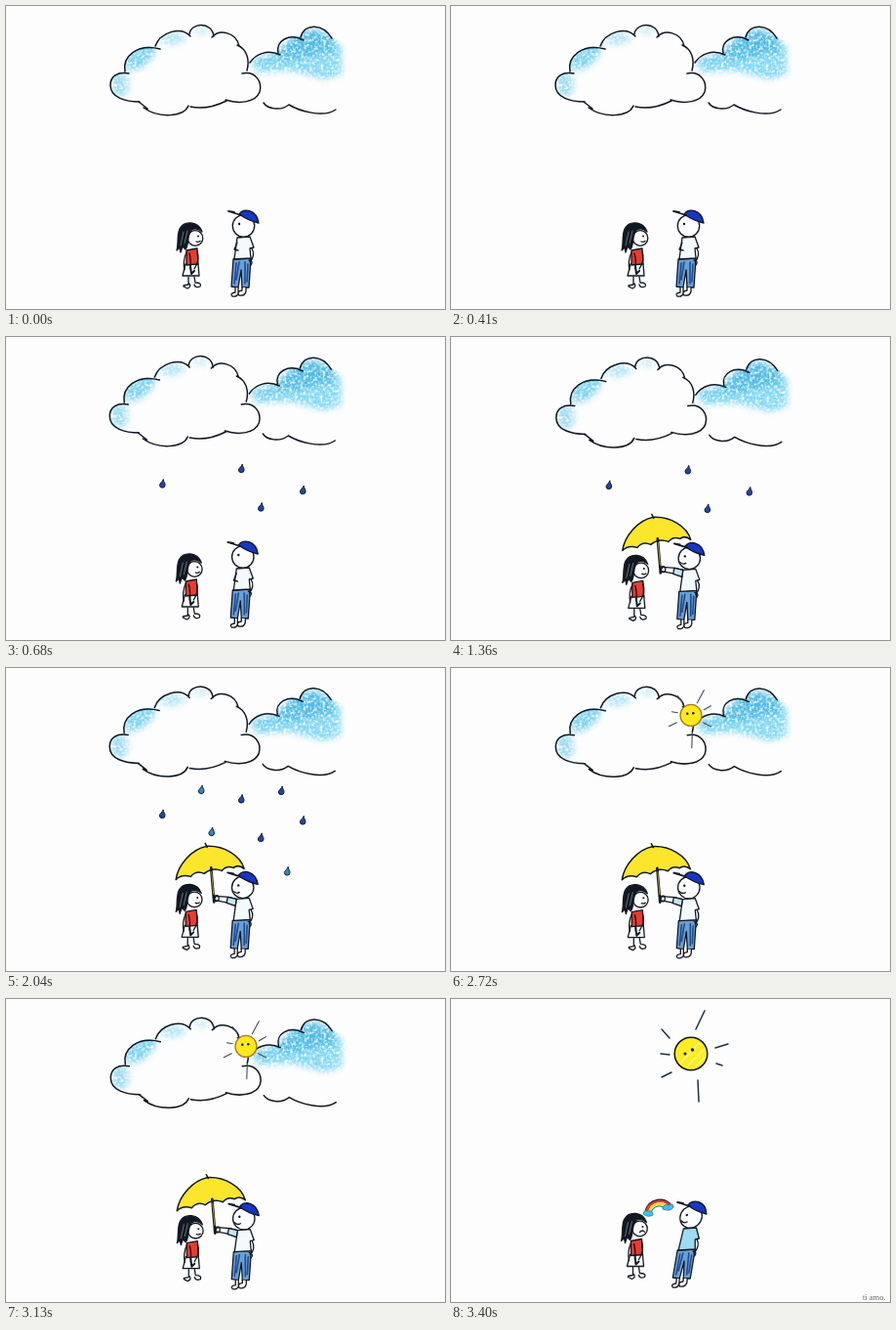
An HTML page for the animation above (4.08 s loop, 450x310 px).

```html
<!DOCTYPE html>
<html lang="it">
<head>
<meta charset="utf-8">
<title>Under the umbrella</title>
<style>
html, body { margin: 0; height: 100%; overflow: hidden; background: #fdfdfd; }
svg { display: block; width: 100vw; height: 100vh; }
.ink { fill: none; stroke: #111821; stroke-width: 1.5; stroke-linecap: round; stroke-linejoin: round; }
.thin { stroke-width: 1.3; }
.dot { fill: #111821; stroke: none; }
.paper { fill: #fdfdfd; }
.wash { filter: url(#crayon); }
text { font: 8.5px "Liberation Serif", "Noto Serif", serif; fill: #666; }
</style>
</head>
<body>
<svg viewBox="0 0 450 310">
  <defs>
    <filter id="crayon" x="-20%" y="-30%" width="140%" height="160%">
      <feGaussianBlur stdDeviation="3" result="soft"/>
      <feTurbulence type="fractalNoise" baseFrequency=".35" numOctaves="2" seed="4"/>
      <feColorMatrix values="0 0 0 0 0  0 0 0 0 0  0 0 0 0 0  2.5 0 0 0 -.45" result="grain"/>
      <feComposite in="soft" in2="grain" operator="in"/>
    </filter>
    <clipPath id="leftCloud"><path d="M137 98C123 98 107 94 107 81C107 72 114 67 122 68C120 52 134 38 153 42C158 27 179 20 188 30C189 17 211 15 213 30C222 22 236 29 239 41C247 45 250 55 247 66V98Z"/></clipPath>
    <clipPath id="rightCloud"><path d="M250 58C256 49 268 44 279 49C276 36 290 27 302 32C306 17 325 18 334 32L350 39V85H250Z"/></clipPath>
    <path id="drop" d="M1-4.500C1-2 3-.5 2.800 1.600A2.800 2.600 0 0 1-2.800 1.600C-2.800-.6 0-1.500 1-4.500Z" stroke="#141e3c"/>
  </defs>

  <g id="scene">
    <g data-show="01234">
      <g clip-path="url(#leftCloud)">
        <g class="wash" fill="#7ad3ef">
          <ellipse cx="138" cy="51" rx="19" ry="10" transform="rotate(-42 138 51)"/>
          <ellipse cx="117" cy="80" rx="9" ry="13" opacity=".75"/>
          <ellipse cx="170" cy="33" rx="14" ry="7" opacity=".55"/>
          <ellipse cx="201" cy="25" rx="9" ry="5" opacity=".35"/>
        </g>
      </g>
      <g clip-path="url(#rightCloud)">
        <g class="wash">
          <path d="M250 57L280 45L300 24L334 29L344 42V70L326 75L292 66L258 68Z" fill="#82d8f4"/>
          <path d="M280 44L298 30L316 22L334 32L338 46L300 54L276 56Z" fill="#3fb2e0" opacity=".75"/>
          <ellipse cx="264" cy="55" rx="9" ry="4" fill="#4db9e2" opacity=".5"/>
        </g>
      </g>
      <g class="ink">
        <path d="M137 98C123 98 107 94 107 81C107 72 114 67 126 69M122 67C119 52 134 38 158 44M153 41C158 27 179 20 189 31M188 29C189 17 211 15 213 31M211 32C219 23 236 27 239 41M237 40C247 44 250 55 247 66"/>
        <path d="M242 69C256 66 263 78 260 88C256 98 240 101 225 96M226 97C216 102 202 106 189 103M187 102C182 114 156 115 141 104M136 98L145 105"/>
        <path d="M250 58C256 49 268 44 281 50M279 48C276 36 290 27 305 35M302 32C306 17 325 18 334 33M264 99C268 105 281 108 290 101C300 107 325 115 338 106"/>
      </g>
    </g>

    <g data-show="123" fill="#2545a0">
      <use href="#drop" x="161" y="150"/>
      <use href="#drop" x="242" y="134.500"/>
      <use href="#drop" x="262" y="174"/>
      <use href="#drop" x="305" y="156.500"/>
    </g>
    <g data-show="3" fill="#3489b8">
      <use href="#drop" x="201" y="125"/>
      <use href="#drop" x="283" y="126" fill="#2545a0"/>
      <use href="#drop" x="211.500" y="168"/>
      <use href="#drop" x="289" y="208.500"/>
    </g>

    <g id="girl" class="ink thin">
      <path class="paper" d="M184 264L181 276L198 276L197 264Z"/>
      <path d="M185 250L196 248L197 264L185 265Z" fill="#ee3a2e"/>
      <path d="M185 252Q181 261 183 270M188 253Q190 260 189 269M196 251Q199 260 193 269"/>
      <path d="M189 266L190 274L193 271" stroke-width="2"/>
      <path d="M187 277L187 285L182 286M193 277L194 283Q201 283 199 287Q194 289 193 285M187 283Q191 287 186 289L182 287"/>
      <circle class="paper" cx="194" cy="237.500" r="7.800"/>
      <path d="M201 231C197 220 183 219 178 228C175 235 177 243 175 250L178 247L179 252L181 246L184 249C188 244 185 236 190 229Q196 226 201 231Z" fill="#111821"/>
      <path d="M182 231L179 245M186 230L183 243" stroke="#8b959e" stroke-width=".7"/>
      <circle class="dot" cx="197" cy="235.500" r="1"/>
      <path d="M195 241q2 1 4-.5" data-show="01234"/>
      <path d="M194 241q3-3 5 0" data-show="5"/>
    </g>

    <g id="boy" class="ink thin">
      <path d="M233 259L251 258L249 288L242 288L241 270L238 288L231 287Z" fill="#6c9fd2"/>
      <path d="M236 263L234 284M239 262L236 280M245 262L245 284M248 264L247 282" stroke="#1c4c94" stroke-width="1.600"/>
      <path d="M235 288L235 293Q229 294 232 297Q237 298 238 294V288M242 288L242 291Q236 292 239 296Q245 297 246 292V288" class="paper"/>
      <path id="shirt" d="M237 237L234 259L251 258L250 248L254 247L250 236Z"/>
      <path d="M252 248Q256 255 250 262M249 260Q254 261 251 265"/>
      <path data-show="01" d="M237 242L234 249L238 250"/>
      <g data-show="234">
        <path class="paper" d="M237 237L229 235L216 234L214 238L229 241L236 244"/>
        <path d="M228 235L237 237L236 244L227 241Z" fill="#c4e5ef"/>
      </g>
      <circle class="paper" cx="243.500" cy="225" r="11.200"/>
      <path d="M239 213C243 206 257 208 259 222Q249 220 239 213Z" fill="#1636c4"/>
      <path d="M241 214L228 210L234 211" stroke-width="1.800"/>
      <circle class="dot" cx="239" cy="223" r="1.200"/>
      <path d="M234 229q3 3 6 1" data-show="2345"/>
    </g>

    <g data-show="234" class="ink">
      <path d="M175 217C177 202 191 186 206 183C224 182 241 192 245 206Q239 201 234 205Q227 202 222 208Q212 204 204 211Q196 207 190 214Q181 211 175 217Z" fill="#fbe62c"/>
      <path d="M205 180L207 184"/>
      <path d="M211 205L214 240" stroke-width="2.600"/>
      <path d="M211.500 209L213.500 232" stroke="#c9a72b" stroke-width=".8"/>
      <path d="M214 234q5-2 5 2t-4 3" class="thin"/>
    </g>

    <g data-show="4" class="ink thin">
      <circle cx="245.700" cy="48.700" r="11" fill="#ffe91d" stroke="#a77b23"/>
      <circle class="dot" cx="242" cy="47" r="1.200"/>
      <circle class="dot" cx="248" cy="46.500" r="1.200"/>
      <path d="M252 36L259 23M259 43L266 39M237 35L232 29M232 46L226 45M231 56L223 60M258 56L266 60M247 66L246.500 82" stroke="#3f4c5a" stroke-width="1.100"/>
    </g>

    <g data-show="5">
      <g class="ink">
        <circle cx="246" cy="56" r="16.800" fill="#ffed1e"/>
        <path d="M236 65L254 45M242 69L260 51M251 69L260 60" stroke="#fff799" stroke-width="1.400"/>
        <circle class="dot" cx="240" cy="56" r="1.500"/>
        <circle class="dot" cx="247.500" cy="52" r="1.700"/>
        <path d="M251 31L260 12M271 50L284 46M272 66L278 68M253 83L254 105M216 80L226 75M215 56L224 57M216 31L224 40" stroke="#19314a"/>
      </g>
      <g fill="none" stroke-width="2.500">
        <path d="M200 218C203 204 220 203 225 212" stroke="#17202b" stroke-width="3.500"/>
        <path d="M200 218C203 205 220 204 225 212" stroke="#e83b28"/>
        <path d="M203 219C205 208 217 207 222 214" stroke="#ffd33a"/>
        <path d="M205 219C207 211 216 210 220 215" stroke="#2f9a61" stroke-width="1.200"/>
      </g>
      <path d="M197 220Q198 215 202 217Q207 216 207 221Q202 224 197 220ZM217 213Q219 209 223 211Q228 208 228 213Q225 218 217 215Z" fill="#42bee8" stroke="#237ca4" stroke-width=".8"/>
      <text x="422" y="308">ti amo.</text>
    </g>
  </g>
</svg>
<script>
const STEP = 680, COUNT = 6;
const jitter = [[0, 0], [-.7, 0], [.8, 1.4], [-.8, -.6], [.3, -.3], [0, 0]];
const $ = id => document.getElementById(id);
const parts = document.querySelectorAll('[data-show]');
let shown = -1;

function draw(pose) {
  const last = pose === COUNT - 1;
  for (const part of parts)
    part.style.display = part.dataset.show.includes(pose) ? '' : 'none';
  $('scene').setAttribute('transform', `translate(${jitter[pose]})`);
  $('girl').setAttribute('transform', last ? 'translate(-.5 -2.5)' : '');
  // The last pose leans the boy back.
  $('boy').setAttribute('transform', last ? 'translate(25 -2) skewX(-5.7)' : '');
  $('shirt').setAttribute('fill', last ? '#9edcf2' : '#f4fafc');
}

const start = performance.now();
function tick() {
  const pose = Math.floor((performance.now() - start) / STEP) % COUNT;
  if (pose !== shown) draw(shown = pose);
  requestAnimationFrame(tick);
}
tick();
</script>
</body>
</html>
```
